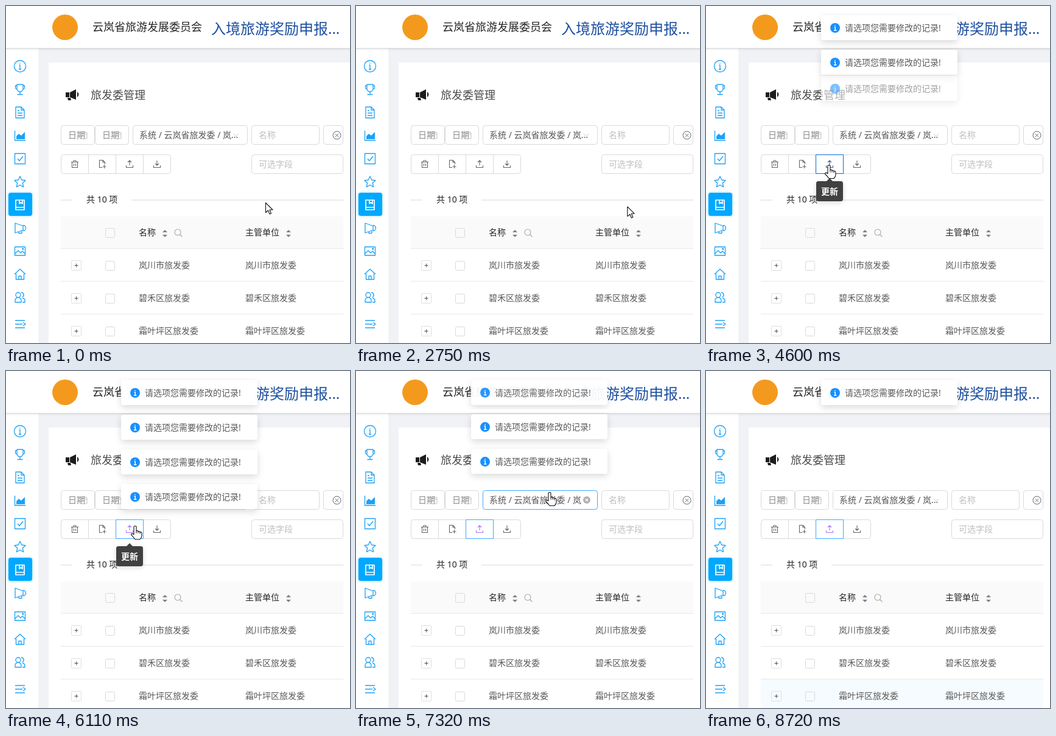
Animation of 565x554 px, one loop 9600 ms. Source, as an HTML page with a canvas:

```html
<!DOCTYPE html>
<html lang="zh-CN">
<head>
<meta charset="utf-8">
<style>
html, body { margin: 0; width: 100%; height: 100%; overflow: hidden; background: #fff; }
canvas { display: block; width: 565px; height: 554px; }
</style>
</head>
<body>
<canvas id="stage" width="565" height="554"></canvas>
<script>
const ctx = document.getElementById('stage').getContext('2d');
const LOOP = 9600, FIRST_MOVE = 660, TICK = 108.8;
const FONT = '"Noto Sans", "Noto Sans CJK SC", "Noto Sans CJK", sans-serif';
const BLUE = '#1ba1f6', LINE = '#d9d9d9', GRAY = '#62656e', ACTIVE = '#40a9ff';
const clamp = v => Math.max(0, Math.min(1, v));

function text(str, x, y, color, size = 14, weight = 400) {
  ctx.font = `${weight} ${size}px ${FONT}`;
  ctx.fillStyle = color;
  ctx.fillText(str, x, y);
}

function rect(x, y, w, h, color) {
  ctx.fillStyle = color;
  ctx.fillRect(x, y, w, h);
}

function round(x, y, w, h, r, color) {
  ctx.beginPath();
  ctx.roundRect(x, y, w, h, r);
  ctx.fillStyle = color;
  ctx.fill();
}

function outline(x, y, w, h, color = LINE, r = 4) {
  ctx.beginPath();
  ctx.roundRect(x + .5, y + .5, w - 1, h - 1, r);
  ctx.strokeStyle = color;
  ctx.lineWidth = 1;
  ctx.stroke();
}

function disc(x, y, r, color) {
  ctx.beginPath();
  ctx.arc(x, y, r, 0, 7);
  ctx.fillStyle = color;
  ctx.fill();
}

function icon(d, x, y, color, width = 1.3, filled = false) {
  const path = new Path2D(d);
  ctx.save();
  ctx.translate(x, y);
  ctx.lineJoin = 'round';
  ctx.lineWidth = width;
  ctx.strokeStyle = ctx.fillStyle = color;
  filled ? ctx.fill(path) : ctx.stroke(path);
  ctx.restore();
}

// A raised box whose shadow lies only outside it, so that it can fade cleanly.
function card(x, y, w, h, color, glow, blur, dy) {
  ctx.save();
  ctx.beginPath();
  ctx.rect(x - 40, y - 40, w + 80, h + 80);
  ctx.roundRect(x, y, w, h, 4);
  ctx.clip('evenodd');
  ctx.shadowColor = glow;
  ctx.shadowBlur = blur;
  ctx.shadowOffsetY = dy;
  round(x, y, w, h, 4, color);
  ctx.restore();
  round(x, y, w, h, 4, color);
}

const MENU = [
  [99, 'M9.5 0a9.5 9.5 0 1 1-19 0a9.5 9.5 0 1 1 19 0M-1.5-2H0V5M-2 5H2M0-5.5v1.4'],
  [137, 'M-5-8H5V-1a5 5 0 0 1-10 0zM-5-6H-7.5V-3a3 3 0 0 0 3 3M5-6H7.5V-3a3 3 0 0 1-3 3M0 4V8M-4.5 8.5H4.5'],
  [175, 'M-7-9H2L7-4V9H-7zM2-9V-4H7M-4-3h3M-4 1H4M-4 5H4'],
  [213, 'M-8.5-8V8H9'],
  [251, 'M-8.5-8.5h17v17h-17zM-4 0L-1 3.5L5-4'],
  [289, 'M0-9L2.7-3L9-2.3L4.3 2L5.6 8.5L0 5.2L-5.6 8.5L-4.3 2L-9-2.3L-2.7-3z'],
  [365, 'M-8-8V8L5 3.5V-3.5zM5-4.5a4.5 4.5 0 0 1 0 9M-2 6v2.5H3V4.5'],
  [403, 'M-8.5-7h17v14h-17zM-8 4L-3-1L1 3L4 0L8 4M4-4.5h1.5v1.5h-1.5z'],
  [441, 'M-9 0L0-8.5L9 0M-6.5-1V8.5H6.5V-1M-2 8V3H2V8'],
  [479, 'M1-4a4 4 0 1 1-8 0a4 4 0 1 1 8 0M-8 8V5a5 5 0 0 1 10 0V8zM2-8a4 4 0 0 1 2 7.5M4 1a5 5 0 0 1 4 5V8H4'],
  [523, 'M-8-6H8M-8 0H4M-8 6H8M5-3L9 0L5 3'],
];

const TOOLS = [
  'M-6-3.5H6M-4.5-3.5V5.5H4.5V-3.5M-2-3.5V-6H2V-3.5M-1.5-1V3M1.5-1V3',
  'M0 5.5H-4.5V-6.5H1L4.5-3V0M1-6.5V-3H4.5M3.5 1V7M.5 4H6.5',
  'M-5.5 2V5.5H5.5V2M0 2V-6M-3-3L0-6L3-3',
  'M-5.5 2V5.5H5.5V2M0 2V-6M-3-1L0 2L3-1',
];

// time, x, y of the pointer tip
const PATH = [
  [600, 426, 324], [900, 380, 262], [1150, 310, 222], [1530, 203, 262], [1600, 203, 262],
  [1857, 142, 417], [2200, 300, 517], [2530, 470, 440], [2850, 430, 262], [3060, 120, 262],
  [3240, 203, 262], [5995, 203, 262], [6095, 212, 256], [6425, 280, 204], [6640, 260, 212],
  [6860, 182, 212], [7296, 319, 200], [7590, 322, 205], [8490, 397, 472], [8600, 418, 521],
];

function pointerAt(s) {
  if (s <= PATH[0][0]) return PATH[0].slice(1);
  for (let i = 1; i < PATH.length; i++) {
    const [t0, x0, y0] = PATH[i - 1], [t1, x1, y1] = PATH[i];
    if (s <= t1) {
      const p = (s - t0) / (t1 - t0);
      return [x0 + (x1 - x0) * p, y0 + (y1 - y0) * p];
    }
  }
  return PATH[PATH.length - 1].slice(1);
}

// The last notice is held open because the pointer visits it.
const NOTICES = [[3670, 6670], [4195, 7195], [4529, 7529], [4860, Infinity]];

function drawChrome() {
  rect(0, 0, 565, 554, '#f0f2f5');
  rect(70, 93, 495, 461, '#fff');
  rect(0, 70, 53, 484, '#fff');
  rect(53, 70, 1, 484, '#f2f4f6');
  card(-10, -10, 585, 79, '#fff', 'rgba(0,0,0,.16)', 4, 1);
  rect(0, 69, 565, 1, '#d8d9db');

  disc(97, 35, 21, '#f39a1e');
  text('云岚省旅游发展委员会', 142, 41, '#262626', 18);
  text('入境旅游奖励申报...', 337, 46, '#1d4f9f', 24);

  card(4, 307, 39, 38, '#00a8ff', 'rgba(0,168,255,.45)', 4, 0);
  for (const [y, d] of MENU) icon(d, 23, y, BLUE);
  icon('M-6 6V1L-2-3L2 0L8-6V6z', 23, 213, BLUE, 1, true);
  icon('M-7-8H7V8H-7zM-7 4H7M-1-8V-2L1.5-4L4-2V-8', 23, 327, '#fff', 1.7);

  icon('M98 142h6v8h-6zM105 142L115 137V154L105 150zM101 151h5l1 4h-5zM117 141q5 4 0 9z', 0, 0, '#1c1c1c', 1, true);
  text('旅发委管理', 139, 153, '#4a4a4a', 18);
}

function drawFilters(s, hot) {
  for (const x of [90, 146]) {
    outline(x, 196, 56, 32, hot(x, 196, 56, 32) ? ACTIVE : LINE);
    text('日期', x + 12, 217, '#8c8c8c');
    icon('M-5-4H5V6H-5zM-5-1H5M-2-6V-3M2-6V-3', x + 38, 212, '#c4c4c4', 1);
  }

  const covered = s > 4860 && s < 6960;
  const selectHot = !covered && hot(208, 196, 189, 32);
  outline(208, 196, 189, 32, selectHot ? ACTIVE : LINE);
  text('系统 / 云岚省旅发委 / 岚' + (selectHot ? '' : '...'), 219, 217, '#555');
  if (selectHot) {
    disc(379, 212, 6, '#b3b3b3');
    icon('M-2-2L2 2M2-2L-2 2', 379, 212, '#fff', 1.2);
  } else {
    icon('M-4-2L0 2.5L4-2', 378, 212, '#c8c8c8', 1);
  }

  outline(403, 196, 112, 32);
  text('名称', 415, 217, '#bfbfbf');
  outline(521, 196, 33, 32);
  icon('M6.5 0a6.5 6.5 0 1 1-13 0a6.5 6.5 0 1 1 13 0M-2.5-2.5L2.5 2.5M2.5-2.5L-2.5 2.5', 543.5, 212.5, '#5f6570', 1);
  outline(403, 244, 151, 32, hot(403, 244, 151, 32) ? ACTIVE : LINE);
  text('可选字段', 415, 265, '#bfbfbf');
}

function drawTools(s, hot) {
  outline(90, 244, 181, 32);
  for (const x of [135, 180, 225]) rect(x, 244, 1, 32, LINE);
  const pressed = NOTICES.some(([start]) => s > start - 90 && s < start + 60);
  TOOLS.forEach((d, i) => {
    const x = 90 + 45 * i;
    const focused = i === 2 && s > 3590;
    const lit = focused || hot(x, 244, 45, 32);
    const down = i === 2 && pressed;
    if (lit) outline(x, 244, 46, 32, down ? '#096dd9' : ACTIVE, i % 3 ? 0 : 4);
    icon(d, x + 23, 260, down ? '#45639f' : lit ? '#a678f0' : GRAY, 1.1);
  });
}

function drawTable(s) {
  rect(90, 318, 19, 2, '#ececec');
  rect(206, 318, 348, 2, '#ececec');
  text('共 10 项', 132, 323, '#262626');

  rect(90, 346, 464, 52, '#fafafa');
  text('名称', 218, 377, '#262626');
  text('主管单位', 393, 377, '#262626');
  for (const x of [261, 464]) icon('M-4-2L0-6L4-2zM-4 2L0 6L4 2z', x, 374, '#7f7f8d', 1, true);
  icon('M4-1a5 5 0 1 1-10 0a5 5 0 1 1 10 0M2.5 2.5L6.5 6.5', 283, 373, '#a6a6a6', 1.1);
  outline(163, 365, 16, 16, LINE, 2);

  ['岚川市旅发委', '碧禾区旅发委', '霜叶坪区旅发委'].forEach((name, i) => {
    const y = 398 + 54 * i;
    if (i === 2 && s > 8650) rect(90, y, 464, 54, '#f6fbff');
    rect(90, y, 464, 1, '#e8e8e8');
    outline(107, y + 20, 17, 17, '#dedede', 1);
    icon('M-3 0H3M0-3V3', 115.5, y + 28.5, '#555', 1);
    outline(163, y + 21, 16, 16, LINE, 2);
    text(name, 218, y + 33, '#595959');
    text(name, 393, y + 33, '#595959');
  });
}

function drawTooltip(s) {
  const fade = (from, to) => clamp(Math.min((s - from) / 100, (to - s) / 100));
  const alpha = Math.max(fade(1400, 1951), fade(3180, 6300));
  if (!alpha) return;
  ctx.save();
  ctx.globalAlpha = alpha;
  card(181, 288, 44, 33, '#404040', 'rgba(0,0,0,.15)', 8, 2);
  icon('M-5 0L0-5L5 0z', 203, 288, '#404040', 1, true);
  text('更新', 189, 310, '#fff', 14, 700);
  ctx.restore();
}

function drawNotices(s) {
  let top = 7;
  for (const [start, end] of NOTICES) {
    if (s < start || s >= end + 300) continue;
    const shown = 1 - Math.pow(1 - clamp((s - start) / 300), 8);
    const x = clamp((s - end) / 300);
    const kept = Math.sqrt(1 - x * x);
    const slot = Math.min(41 + 16 * kept, 150 * kept);
    const y = top + 8 * kept - 57 * (1 - shown);

    ctx.save();
    ctx.globalAlpha = shown * shown * kept;
    if (x > 0) {
      ctx.beginPath();
      ctx.rect(0, top, 565, slot);
      ctx.clip();
    }
    card(189, y, 224, 41, '#fff', 'rgba(0,0,0,.15)', 12, 4);
    disc(212, y + 21, 8, '#1890ff');
    icon('M-1.5-1H.3V4M-2 4H2.5M0-4.5v1.6', 212, y + 21, '#fff', 1.4);
    text('请选项您需要修改的记录!', 228, y + 26, '#595959');
    ctx.restore();
    top += slot;
  }
}

function drawPointer(x, y, hand) {
  const d = hand
    ? 'M-3.5 1Q-1.5-1 .5 1V8Q2.5 7 3.5 9Q5.5 8 6.5 10Q9.5 9.5 9.5 12V16Q9.5 19 6.5 22H-1.5Q-4.5 18-8 14.5Q-8 11-3.5 14z'
    : 'M0 0V16L4 12.5L6.5 18.5L9 17.5L6.5 11.5H11.5z';
  icon(d, x + .5, y - .5, '#fff', 1, true);
  icon(d, x + .5, y - .5, '#111', 1.1);
  if (hand) icon('M.5 8V12M3.5 9V12M6.5 10V13', x + .5, y - .5, '#111', 1);
}

function draw(t) {
  const s = t < FIRST_MOVE ? 0 : FIRST_MOVE + Math.floor((t - FIRST_MOVE) / TICK) * TICK;
  const [px, py] = pointerAt(s);
  const visible = s < 8650;
  const hot = (x, y, w, h) => visible && px >= x && px < x + w && py >= y && py < y + h;
  const overNotice = s > 6300 && s < 6960;

  drawChrome();
  drawFilters(s, hot);
  drawTools(s, hot);
  drawTable(s);
  drawTooltip(s);
  drawNotices(s);
  if (visible) {
    const hand = !overNotice && (hot(208, 196, 189, 32) || hot(90, 244, 181, 32));
    drawPointer(px, py, hand);
  }
}

function frame() {
  draw(performance.now() % LOOP);
  requestAnimationFrame(frame);
}
frame();
</script>
</body>
</html>
```
